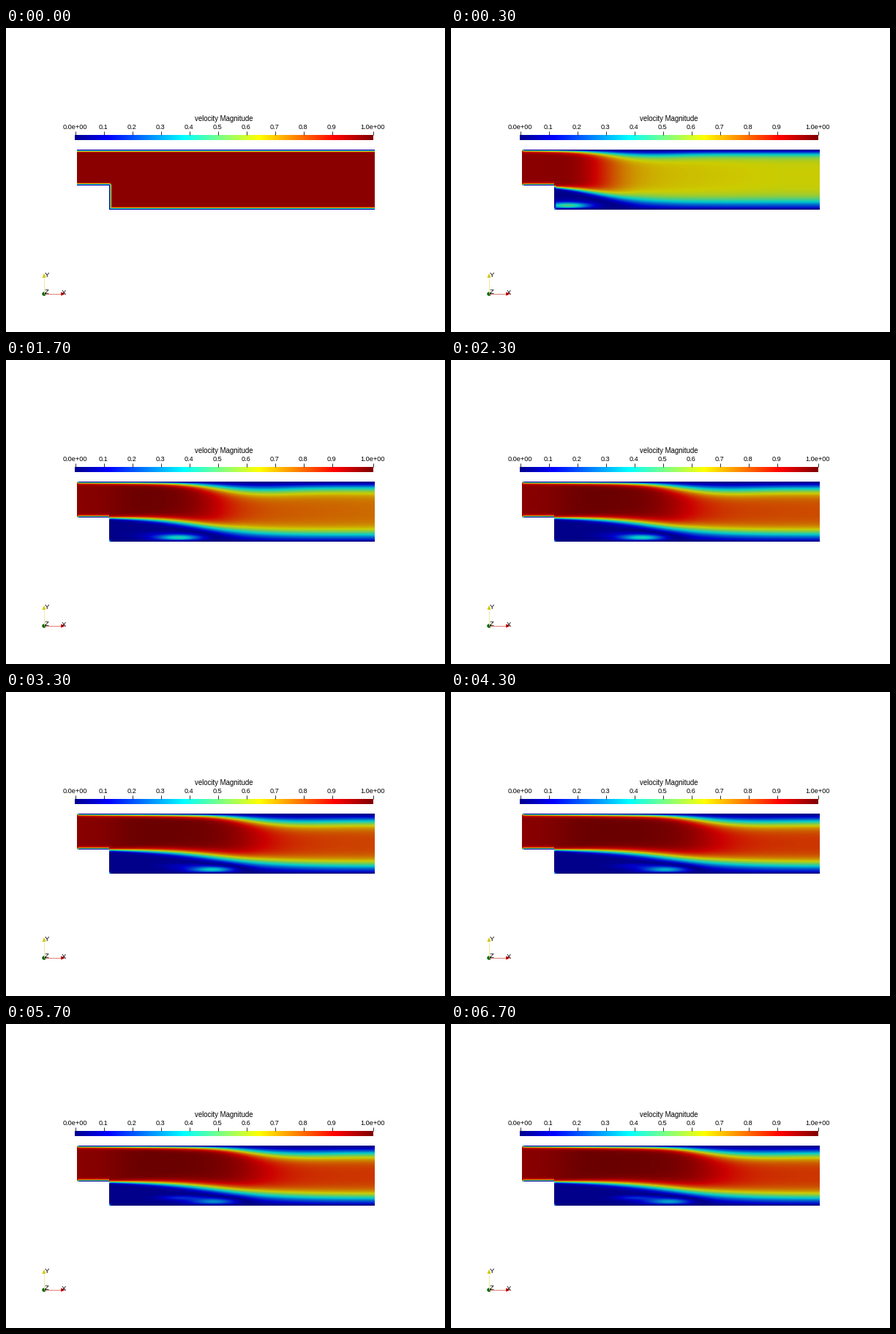
A matplotlib script that plays this animation: 600x415 px, repeating every 7000 ms.

```python
import numpy as np
import matplotlib.pyplot as plt
from matplotlib.animation import FuncAnimation
from matplotlib.colors import LinearSegmentedColormap
from matplotlib.patches import Circle, Polygon

W, H, DPI = 600, 415, 100
LEFT, RIGHT, TOP, BOTTOM = 97, 504, 167, 248
STEP_X, STEP_Y = 141, 215
FRAMES, INTERVAL, STATES = 70, 100, 21
SHADE = .8      # the lit surface is darker than its legend
INFLOW = .955   # inlet speed as a share of the top of the scale


def jet(light):
    stops = [(0, (0, 0, .5625)), (.111, (0, 0, 1)), (.365, (0, 1, 1)),
             (.619, (1, 1, 0)), (.873, (1, 0, 0)), (1, (.5, 0, 0))]
    shaded = [(p, tuple(light * c for c in rgb)) for p, rgb in stops]
    return LinearSegmentedColormap.from_list("jet_lit", shaded, N=512)


# Time in seconds against the flow parameters at that time.
KEYS = [.33, .67, 1, 2.33, 3.33, 4.33, 5.67, 6.67]
EDDY_X = [160, 188, 212, 262, 283, 295, 286, 300]
DROP = [.35, .295, .255, .2, .19, .18, .18, .18]
SLOPE = [.03, .04, .04, .02, .02, .01, .01, .01]
LAYER = [.6, .85, 1, 1, 1, 1, 1, 1]
EDDY = [.42, .40, .37, .36, .34, .30, .25, .28]
TAIL = [0, 0, 0, .02, .04, .06, .12, .12]

x, y = np.meshgrid(np.arange(LEFT, RIGHT) + .5, np.arange(TOP, BOTTOM) + .5)
solid = (x < STEP_X) & (y > STEP_Y)
upstream = x < STEP_X


def sigmoid(v):
    return .5 * (1 + np.tanh(v / 2))


def bump(cx, cy, sx, sy):
    return np.exp(-((x - cx) / sx) ** 2 - ((y - cy) / sy) ** 2)


def wall_profile(d, a, w):
    """Zero at the wall, one far away, with its bend at distance a."""
    k = np.tanh(a / w)
    return (np.tanh((d - a) / w) + k) / (1 + k)


def start_field():
    floor = np.where(upstream, STEP_Y - y, BOTTOM - y)
    side = np.where(y > STEP_Y, x - STEP_X,
                    np.hypot(x - STEP_X, y - STEP_Y) + 99 * upstream)
    d = np.minimum(np.minimum(y - TOP, floor), side)
    return INFLOW * np.clip((d - .2) / 3.6, 0, 1)


def flow_field(t):
    ex, drop, slope, layer, eddy, tail = (
        np.interp(t, KEYS, v) for v in (EDDY_X, DROP, SLOPE, LAYER, EDDY, TAIL))
    grown = np.clip((ex - 212) / 78, 0, 1)

    # Core speed rises past the step and falls where the channel widens.
    g = sigmoid((x - ex - 50 - 10 * grown) / (21 + 4 * grown))
    core = INFLOW + .04 * sigmoid((x - STEP_X - 10) / 14) - drop * g
    core -= slope * np.clip((x - ex - 100) / 190, 0, 1)

    # Layer along the upper wall.
    g = layer * sigmoid((x - ex - 37) / (20 + 4 * grown))
    swell = np.exp(-((x - ex - 105) / 65) ** 2)
    a = g * (5 + 4.5 * grown + (5 - 3.5 * grown) * swell)
    w = 2.1 + 1.3 * np.clip((x - LEFT) / 150, 0, 1) + 6.7 * g
    upper = wall_profile(np.maximum(y - TOP - .4, 0), a, w)

    # Shear layer behind the step.
    mid = ex + 50 - 38 * grown
    rise = 24 - 2 * grown
    edge = STEP_Y + rise * sigmoid((x - mid) / (32 + 13 * grown))
    reach = np.clip((x - STEP_X) / (mid + 50 - STEP_X), 0, 1)
    shear = sigmoid(2 * (edge - y) / (2 + 8 * reach ** 1.1))
    floor = np.tanh(np.maximum(STEP_Y - y - .4, 0) / 2.1)
    lower = np.where(upstream, floor, shear)

    inlet = np.exp(-((x - LEFT) / 2) ** 2)
    sides = upper * lower
    u = core * (sides + (1 - sides) * .6 * inlet)

    # Reverse flow near the floor.
    back = (eddy - .08) * bump(ex, 242.5, 28, 4)
    back += .13 * bump(ex - 8, 241, 48, 7)
    back += tail * bump(ex - 52, 237, 30, 3.2)
    u = np.sqrt((u - back * ~upstream) ** 2 + .03 ** 2)

    below = ~upstream & (y > STEP_Y)
    u *= np.where(upstream, 1, np.clip((BOTTOM - y) / 3, 0, 1))
    u *= np.where(below, np.clip((x - STEP_X) / 3, 0, 1), 1)
    for corner in (STEP_Y + 1, BOTTOM - 1):
        u += .35 * bump(STEP_X + .5, corner, 1.6, 1.6) * below
    return u


def field(k):
    u = start_field() if k == 0 else flow_field(k / 3)
    return np.ma.array(np.clip(u, 0, 1), mask=solid)


fields = [field(k) for k in range(STATES)]

fig = plt.figure(figsize=(W / DPI, H / DPI), dpi=DPI, facecolor="white")
ax = fig.add_axes([0, 0, 1, 1])
ax.axis("off")


def label(px, py, s, size=9.2):
    ax.text(px, py, s, fontsize=size * 72 / DPI, family="Liberation Sans",
            color="black", ha="center", va="center_baseline")


def line(xs, ys, color, width=1):
    ax.plot(xs, ys, color=color, lw=width * 72 / DPI, solid_capstyle="butt")


def shape(points, color):
    ax.add_patch(Polygon(points, fc=color, ec="none"))


def picture(data, light, box):
    return ax.imshow(data, cmap=jet(light), vmin=0, vmax=1, aspect="auto",
                     extent=box, interpolation="nearest")


# Colour legend
picture(np.linspace(0, 1, 408)[None], 1, (94, 502, 153, 146))
label(298, 123.2, "velocity Magnitude", 9.6)
for i in range(11):
    px = 94.5 + 39 * i if i < 10 else 501.5
    line([px, px], [141, 146], "black", .8)
    label(px - .3, 134, f"{i / 10:.1f}" + ("e+00" if i in (0, 10) else ""))

# Axis marker
line([52, 52], [362, 342], "#efe9a0", 1)
shape([(49.5, 341), (54.5, 341), (52, 335)], "#d2c800")
line([52, 75], [363, 363], "#e08078", 1)
shape([(75, 360.5), (75, 365.5), (81, 363)], "#d80000")
ax.add_patch(Circle((52, 363), 2.7, fc="#006400", ec="none"))
label(56, 336.7, "Y", 9.5)
label(56, 359.3, "Z", 9.5)
label(79, 360.3, "X", 9.5)

image = picture(fields[0], SHADE, (LEFT, RIGHT, BOTTOM, TOP))
ax.set_xlim(0, W)
ax.set_ylim(H, 0)


def update(i):
    image.set_data(fields[int((i + .5) * .3)])
    return [image]


anim = FuncAnimation(fig, update, frames=FRAMES, interval=INTERVAL,
                     repeat=True, repeat_delay=0, blit=False)
plt.show()
```
